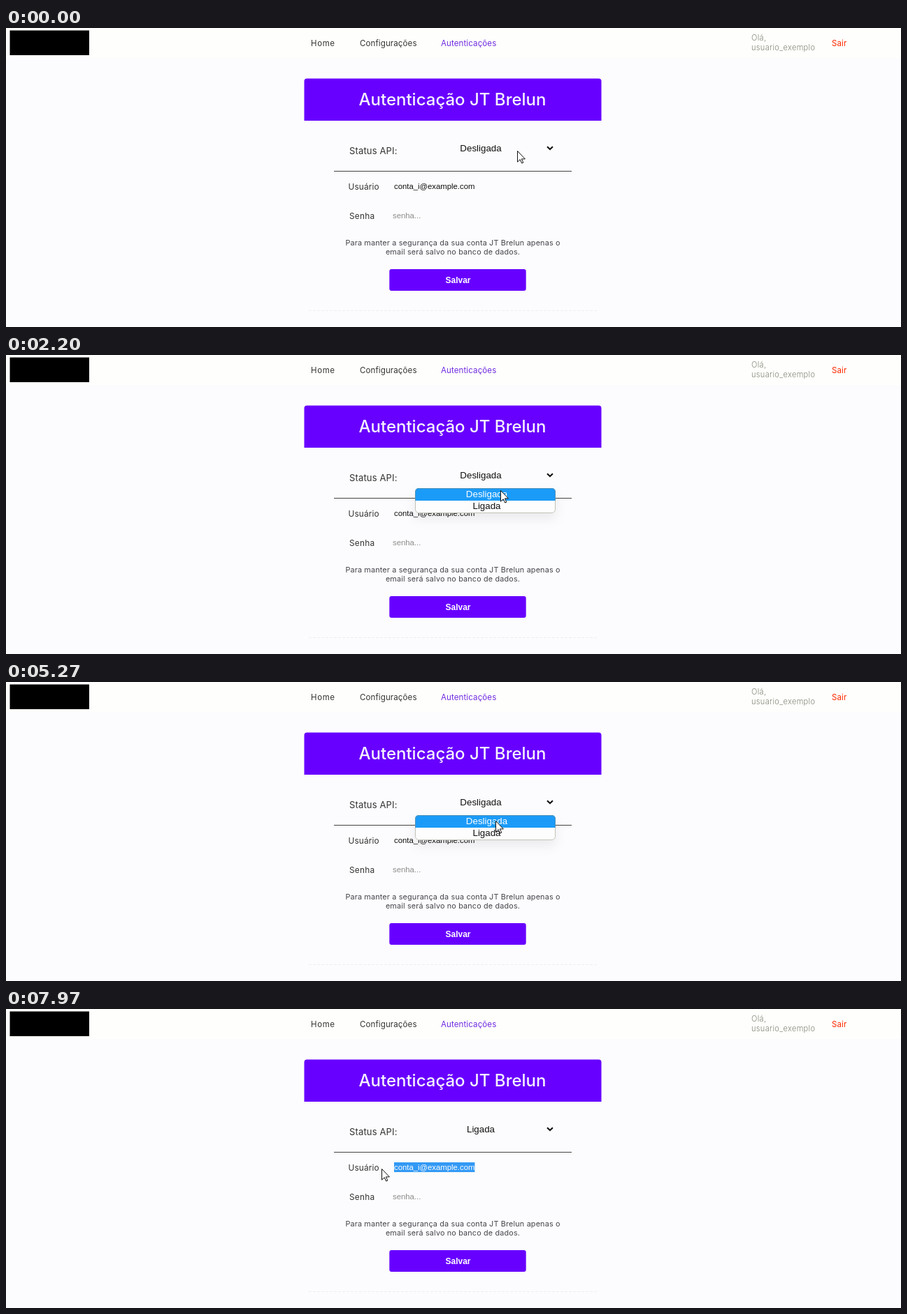
An HTML page for the animation above (8000 ms loop, 1280x429 px).

```html
<!DOCTYPE html>
<html lang="pt-BR">
<head>
<meta charset="utf-8">
<title>Autenticação</title>
<style>
  html, body { margin: 0; width: 100%; height: 100%; overflow: hidden; background: #fcfcfe; }
  svg { display: block; width: 100vw; height: 100vh; }
  text { font-family: Inter, "Open Sans", sans-serif; fill: #333; white-space: pre; }
  .ui { font-family: "Liberation Sans", Arial, sans-serif; fill: #111; }
  .mid { text-anchor: middle; }
  .nav { font-size: 11.5px; letter-spacing: .12px; }
  .user { font-size: 11px; letter-spacing: .35px; font-weight: 300; fill: #85857a; }
  .label { font-size: 11.8px; letter-spacing: .15px; }
  .note { font-size: 10.8px; letter-spacing: .17px; fill: #44444a; }
  .option { font-size: 13.333px; }
  .field { font-size: 11.33px; }
  #menu { filter: drop-shadow(0 8px 8px rgba(0, 0, 0, .07)); }
</style>
</head>
<body>
<svg viewBox="0 0 1280 429" preserveAspectRatio="xMinYMin meet">
  <rect width="1280" height="429" fill="#fcfcfe"/>
  <rect width="1280" height="43" fill="#fefefc"/>
  <rect x="5.5" y="3.5" width="113.5" height="35.5" fill="#000"/>

  <text class="nav" x="436" y="25.5" style="letter-spacing:.6px">Home</text>
  <text class="nav" x="506" y="25.5">Configurações</text>
  <text class="nav" x="622" y="25.5" style="fill:#6f2ae0">Autenticações</text>
  <text class="user" x="1066" y="18">Olá,</text>
  <text class="user" x="1066" y="32">usuario_exemplo</text>
  <text class="nav" x="1181" y="25.5" style="fill:#ff2a00">Sair</text>

  <path d="M426.5 133V76.5q0-4 4-4H847.5q4 0 4 4V133Z" fill="#6800ff"/>
  <text class="mid" x="638.5" y="111" style="font-size:24px;font-weight:500;fill:#f6f2ff">Autenticação JT Brelun</text>

  <text x="491" y="180.5" style="font-size:13px;letter-spacing:.15px">Status API:</text>
  <text id="status" class="ui mid option" x="679" y="177">Desligada</text>
  <path d="M774 170.2l4 3.8 4-3.8" fill="none" stroke="#111" stroke-width="2"/>
  <path d="M469 205.5H809" stroke="#444"/>

  <text class="label" x="489.5" y="231.5">Usuário</text>
  <text id="email" class="ui field" x="555" y="230.5">conta_i@example.com</text>
  <g id="selection">
    <clipPath id="selectedArea"><rect id="clipBox" y="220" height="14"/></clipPath>
    <rect id="selectBox" y="220" height="14" fill="#3399f5"/>
    <text class="ui field" x="555" y="230.5" clip-path="url(#selectedArea)" style="fill:#fff">conta_i@example.com</text>
  </g>
  <path id="caret" stroke="#111"/>

  <text class="label" x="491" y="274" style="letter-spacing:.3px">Senha</text>
  <text class="ui field" x="553" y="273" style="fill:#8c8c8c">senha...</text>
  <text class="note mid" x="639" y="312">Para manter a segurança da sua conta JT Brelun apenas o</text>
  <text class="note mid" x="639" y="325">email será salvo no banco de dados.</text>

  <rect x="548.3" y="346" width="195.4" height="31" rx="3" fill="#6800ff"/>
  <text class="ui mid" x="646.5" y="366" style="font-size:12px;font-weight:700;fill:#fff">Salvar</text>
  <path d="M433 405.5H845" stroke="#efeff1" stroke-dasharray="4 2"/>

  <g id="menu">
    <clipPath id="menuShape"><rect x="585" y="191" width="201" height="36" rx="5"/></clipPath>
    <rect x="585" y="191" width="201" height="36" rx="5" fill="#fdfdfd"/>
    <rect id="highlight" x="585" width="201" height="18" fill="#1b9bf8" clip-path="url(#menuShape)"/>
    <rect x="585.5" y="191.5" width="200" height="35" rx="5" fill="none" stroke="#8a8a78" stroke-opacity=".5"/>
    <text id="optionOff" class="ui mid option" x="687.5" y="204">Desligada</text>
    <text id="optionOn" class="ui mid option" x="687.5" y="221">Ligada</text>
  </g>

  <g id="pointer">
    <path id="arrow" d="M.5 .5V16.2L4.2 12.7 6.7 18 8.8 17.1 6.4 11.9H11.4Z" fill="#fff" stroke="#111"/>
    <path id="beam" d="M-3-8h2l1 1 1-1h2M0-7V7M-3 8h2l1-1 1 1h2" fill="none" stroke="#111"/>
  </g>
</svg>
<script>
const LOOP = 8000;
const $ = id => document.getElementById(id);
const clamp = v => Math.max(0, Math.min(1, v));
const show = (node, on) => { node.style.display = on ? '' : 'none'; };

// Pointer stops: time, x, y
const route = [
  [30, 731, 176], [830, 750, 139], [870, 750, 139], [1070, 748, 138], [1530, 709, 177],
  [2170, 709, 177], [2200, 707, 194], [2500, 703, 226], [2700, 701, 226], [3000, 698, 205],
  [3100, 701, 200], [4200, 701, 200], [4470, 707, 169], [4950, 707, 169], [5270, 700, 199],
  [5470, 694, 204], [5650, 694, 204], [5730, 688, 219], [6400, 688, 219], [6870, 666, 245],
  [7200, 687, 230], [7600, 687, 230], [7970, 537, 229]
];

// Menu: opening start, opening end, closing start, closing end
const openings = [[1800, 1950, 3720, 3770], [4680, 4830, 5980, 6100]];

function pointerAt(t) {
  const next = route.findIndex(stop => stop[0] > t);
  if (next === 0) return route[0].slice(1);
  if (next < 0) return route[route.length - 1].slice(1);
  const [t0, x0, y0] = route[next - 1], [t1, x1, y1] = route[next];
  const p = (t - t0) / (t1 - t0), k = p * p * (3 - 2 * p);
  return [x0 + (x1 - x0) * k, y0 + (y1 - y0) * k];
}

function menuOpacity(t) {
  return Math.max(...openings.map(([a, b, c, d]) =>
    Math.min(clamp((t - a) / (b - a)), clamp((d - t) / (d - c)))));
}

function drawSelection(t, x) {
  const email = $('email'), end = 555 + email.getComputedTextLength();
  let left = end;
  if (t >= 7600) {
    for (let i = email.getNumberOfChars() - 1; i >= 0; i--) {
      const from = email.getStartPositionOfChar(i).x;
      if ((from + email.getEndPositionOfChar(i).x) / 2 < x) break;
      left = from;
    }
  }
  for (const box of [$('selectBox'), $('clipBox')]) {
    box.setAttribute('x', left);
    box.setAttribute('width', end - left);
  }
  show($('selection'), left < end);
  show($('caret'), t >= 7400 && left === end);
  $('caret').setAttribute('d', `M${Math.floor(end) + .5} 220V233`);
}

function render(t) {
  const [x, y] = pointerAt(t).map(Math.round);
  const opacity = menuOpacity(t);
  const second = y >= 209;

  $('status').textContent = t < 6000 ? 'Desligada' : 'Ligada';
  show($('menu'), opacity > 0);
  $('menu').style.opacity = opacity;
  $('highlight').setAttribute('y', second ? 209 : 191);
  $('optionOff').style.fill = second ? '#111' : '#fff';
  $('optionOn').style.fill = second ? '#fff' : '#111';

  drawSelection(t, x);

  const overField = opacity === 0 && x > 550 && x < 790 && y > 216 && y < 239;
  show($('arrow'), !overField);
  show($('beam'), overField);
  $('pointer').setAttribute('transform', `translate(${x} ${y})`);
}

const start = performance.now();
function tick() {
  render((performance.now() - start) % LOOP);
  requestAnimationFrame(tick);
}
tick();
</script>
</body>
</html>
```
